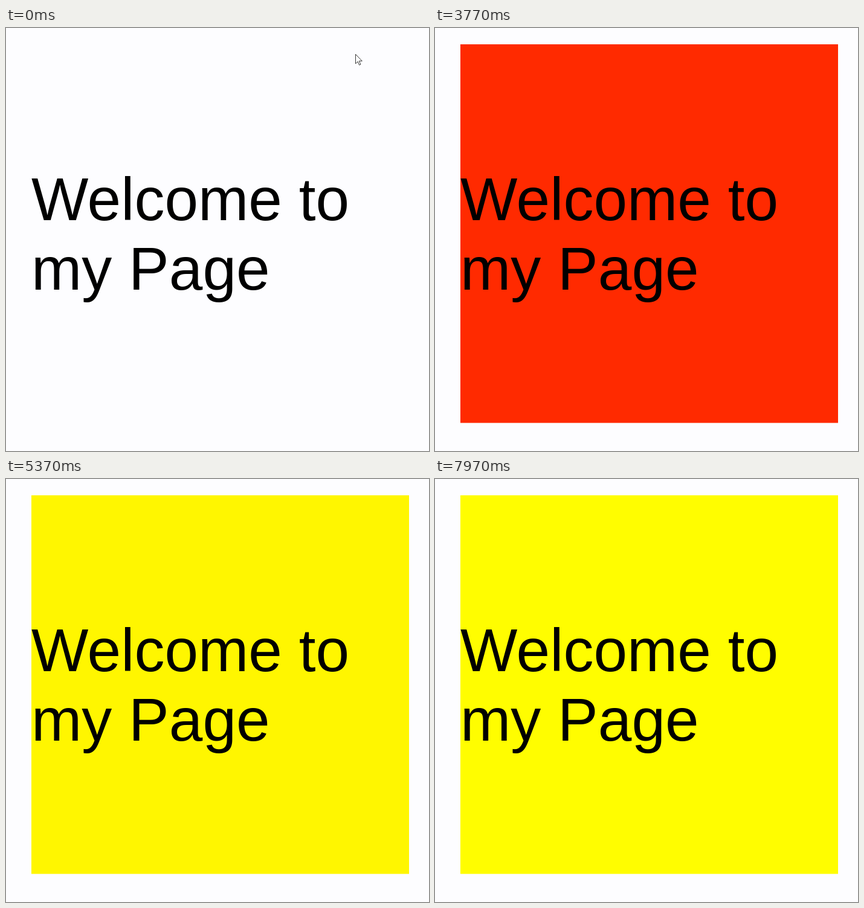
These frames come from a looping animation (700 by 700 pixels, 8000 ms). An HTML page:

```html
<!DOCTYPE html>
<html lang="en">
<head>
<meta charset="utf-8">
<title>Welcome</title>
<style>
  html, body { margin: 0; width: 100%; height: 100%; overflow: hidden; background: #fdfdff; }
  svg { display: block; width: 700px; height: 700px; }
  text { font: 100px "Liberation Sans", Arial, sans-serif; }
</style>
</head>
<body>
<svg viewBox="0 0 700 700">
  <rect id="box" x="42" y="27" width="625" height="626.5"/>
  <text x="42" y="318">Welcome to</text>
  <text x="42" y="433">my Page</text>
  <path id="cursor" d="M.5 .5V16l3.6-3.4 2.5 5.7 2.3-1-2.5-5.6H11.3Z" fill="#fff" stroke="#222" stroke-width=".9"/>
</svg>
<script>
const LOOP = 8000, FPS = 30;
const FLASH_AT = 2400, FLASH_DELAY = 42, FLASH_LENGTH = 427;
const box = document.getElementById('box');
const cursor = document.getElementById('cursor');

const clamp = x => Math.min(1, Math.max(0, x));
const smooth = x => x * x * (3 - 2 * x);

// cubic-bezier(0, 0, .58, 1), solved by bisection
function easeOut(x) {
  let lo = 0, hi = 1;
  for (let i = 0; i < 20; i++) {
    const s = (lo + hi) / 2;
    if (1.74 * (1 - s) * s * s + s ** 3 < x) lo = s; else hi = s;
  }
  return lo * lo * (3 - 2 * lo);
}

function draw(now) {
  // hold each picture for one step of the frame rate
  const t = Math.floor((now % LOOP) * FPS / 1000 + 1e-6) * 1000 / FPS;

  const glide = smooth(clamp(t / 370));
  const x = t < 530 ? 578 + 112 * glide : 700;
  cursor.setAttribute('transform', `translate(${x} ${43 + 2 * glide})`);

  const shown = t >= FLASH_AT - 1;
  box.style.display = shown ? '' : 'none';
  if (shown) {
    const phase = Math.max(0, t - FLASH_AT - FLASH_DELAY) / FLASH_LENGTH % 1;
    box.setAttribute('fill', `rgb(255, ${Math.round(255 * easeOut(phase))}, 0)`);
  }
}

const start = performance.now();
function tick() {
  draw(performance.now() - start);
  requestAnimationFrame(tick);
}
tick();
</script>
</body>
</html>
```
